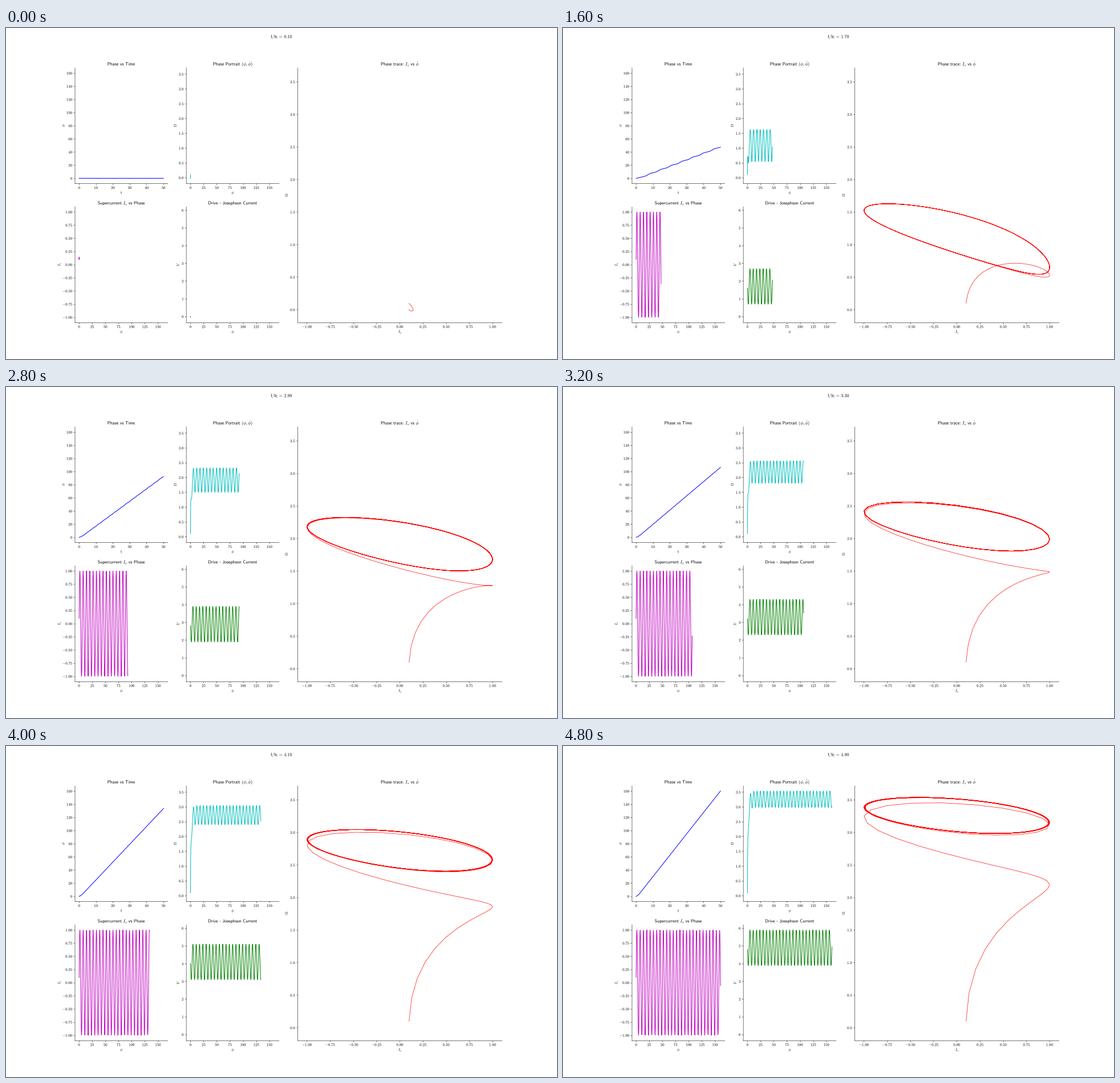
A matplotlib script for the animation above (4.9 s loop, 966 px wide and 580 px high).

```python
import numpy as np
import matplotlib.pyplot as plt
from matplotlib.animation import FuncAnimation
from matplotlib.lines import Line2D
from matplotlib.patches import PathPatch
from matplotlib.textpath import TextPath
from matplotlib.transforms import Affine2D

plt.rcParams['mathtext.fontset'] = 'cm'
plt.rcParams['font.family'] = 'Liberation Sans'

W, H, DPI = 966, 580, 48.3
PT = DPI / 72              # pixels per point
GRID = DPI / 100           # hairlines sit on a 100 dpi pixel grid
TITLE = 11.75
BETA = 1.5
DT, SUB = 0.1, 5
drive = np.arange(1, 50) / 10
t = np.arange(501) * DT


def simulate():
    """Damped, driven junction phase for every drive level at once (RK4)."""
    def rate(s):
        phi, om = s
        return np.array([om, drive - BETA * om - np.sin(phi)])

    h = DT / SUB
    s = np.full((2, drive.size), 0.1)
    out = [s]
    for _ in t[1:]:
        for _ in range(SUB):
            k1 = rate(s)
            k2 = rate(s + h / 2 * k1)
            k3 = rate(s + h / 2 * k2)
            k4 = rate(s + h * k3)
            s = s + h / 6 * (k1 + 2 * k2 + 2 * k3 + k4)
        out.append(s)
    return np.array(out).transpose(1, 2, 0)


def sans(text):
    """Sans-serif text with $math$ parts, as one mathtext string."""
    gap, tight = r'\hspace{0.38}', r'\hspace{-0.2}'
    parts = []
    for i, part in enumerate(text.split('$')):
        if i % 2 == 0 and part:
            part = part.replace(' ', gap).replace('-', r'}$-$\mathsf{')
            for sym in ':=':
                part = part.replace(sym, tight + sym + tight)
            part = r'\mathsf{' + part + '}'
        parts.append(part)
    return '$' + ''.join(parts) + '$'


def outline(text, x, y, size=10, ha=0.5, rot=0):
    """Glyph outlines with the baseline at pixel (x, y), y pointing down."""
    path = TextPath((0, 0), text, size=size * PT)
    box = path.get_extents()
    place = Affine2D().translate(-box.x0 - ha * box.width, 0)
    place.rotate_deg(rot).scale(1, -1).translate(x, y)
    return path.transformed(place)


def write(*args, **kw):
    patch = PathPatch(outline(*args, **kw), fc='k', lw=0, transform=pixels)
    return fig.add_artist(patch)


def snap(v):
    return (np.floor(v / GRID + 0.5 + 1e-6) + 0.5) * GRID


def rule(x0, y0, x1, y1, cap='butt'):
    fig.add_artist(Line2D([x0, x1], [y0, y1], color='k', lw=0.8, snap=False,
                          solid_capstyle=cap, transform=pixels))


def scale(data, step, digits):
    """Limits with a 5 % margin, tick fractions and tick labels."""
    lo, hi = data.min(), data.max()
    pad = 0.05 * (hi - lo)
    lo, hi = lo - pad, hi + pad
    ticks = step * np.arange(np.ceil(lo / step), np.floor(hi / step) + 1)
    labels = [rf'$\mathrm{{{v + 0.0:.{digits}f}}}$' for v in ticks]
    return (lo, hi), list(zip((ticks - lo) / (hi - lo), labels))


def panel(cell, title, xaxis, yaxis, color, lw):
    x, xlabel, *xspec = xaxis
    y, ylabel, *yspec = yaxis
    ax = fig.add_subplot(cell)
    ax.axis('off')
    xlim, xticks = scale(x, *xspec)
    ylim, yticks = scale(y, *yspec)
    ax.set(xlim=xlim, ylim=ylim)

    pos = ax.get_position()
    left, right = pos.x0 * W, pos.x1 * W
    top, bottom = (1 - pos.y1) * H, (1 - pos.y0) * H
    mid_x, mid_y = (left + right) / 2, (top + bottom) / 2
    sx, sy = snap(left), snap(bottom)
    rule(sx, sy, snap(right), sy, 'projecting')
    rule(sx, sy, sx, snap(top), 'projecting')

    for f, label in xticks:
        px = left + f * (right - left)
        rule(snap(px), sy, snap(px), sy + 3.5 * PT)
        write(label, px, bottom + 14 * PT)
    edge = left
    for f, label in yticks:
        py = bottom - f * (bottom - top)
        rule(sx - 3.5 * PT, snap(py), sx, snap(py))
        text = write(label, left - 7.4 * PT, py + 3.5 * PT, ha=1)
        edge = min(edge, text.get_path().get_extents().x0)

    write(sans(title), mid_x, top - 6 * PT, size=TITLE)
    write(xlabel, mid_x, bottom + 26.8 * PT)
    write(ylabel, edge - 6.4 * PT, mid_y, rot=90)
    line, = ax.plot([], [], color, lw=lw)
    return line, x, y


fig = plt.figure(figsize=(W / DPI, H / DPI), dpi=DPI)
pixels = Affine2D().scale(1 / W, -1 / H).translate(0, 1) + fig.transFigure
cells = fig.add_gridspec(2, 4)

phi, omega = simulate()
current = np.sin(phi)
volt = drive[:, None] - current
time = np.tile(t, (drive.size, 1))

# data, label, tick step, decimals
time_ax = (time, sans('t'), 10, 0)
phase_x = (phi, r'$\phi$', 25, 0)
phase_y = (phi, r'$\phi$', 20, 0)
speed = (omega, r'$\Omega$', 0.5, 1)
super_ax = (current, '$I_s$', 0.25, 2)
volt_ax = (volt, '$V$', 1, 0)

curves = [
    panel(cells[0, 0], 'Phase vs Time', time_ax, phase_y, 'b', 1.5),
    panel(cells[0, 1], r'Phase Portrait $(\phi,\dot{\phi})$',
          phase_x, speed, 'c', 1.5),
    panel(cells[1, 0], 'Supercurrent $I_s$ vs Phase',
          phase_x, super_ax, 'm', 1.5),
    panel(cells[1, 1], 'Drive - Josephson Current',
          phase_x, volt_ax, 'g', 1.5),
    panel(cells[:, 2:], r'Phase trace: $I_s$ vs $\dot{\phi}$',
          super_ax, speed, 'r', 1.0),
]


def heading(i):
    return sans(f'I/Ic = {drive[i]:.2f}'), W / 2, 17.6, TITLE


header = write(*heading(0))


def update(i):
    header.set_path(outline(*heading(i)))
    for line, x, y in curves:
        line.set_data(x[i], y[i])
    return [header] + [c[0] for c in curves]


anim = FuncAnimation(fig, update, frames=drive.size, interval=100,
                     repeat=True, cache_frame_data=False)
plt.show()
```
